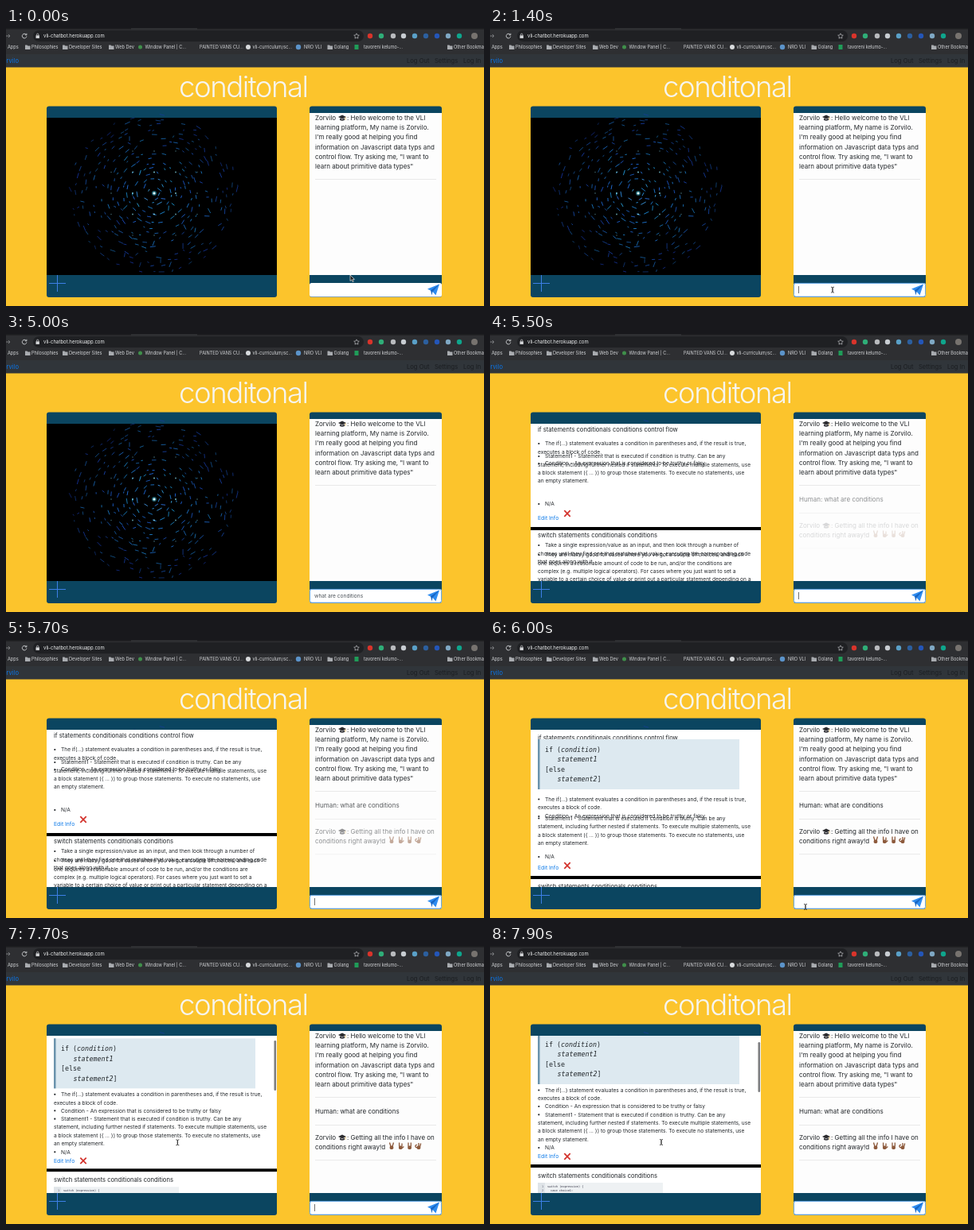
An HTML page for the animation above (8000 ms loop, 600 px wide and 350 px high).

```html
<!DOCTYPE html>
<html lang="en">
<head>
<meta charset="utf-8">
<title>Chatbot demo</title>
<style>
html, body { margin: 0; width: 100%; height: 100%; overflow: hidden; background: #fcc42c; }
svg { display: block; width: 600px; height: 350px; font-family: Inter, "Open Sans", sans-serif; }
.mono { font-family: "DejaVu Sans Mono", monospace; }
</style>
</head>
<body>
<svg id="stage" viewBox="0 0 600 350"></svg>
<script>
const LOOP = 8000, INK = '#212529', TEAL = '#0b4560';
const BOT = 'Zorvilo';

// ---- drawing helpers: y of a text is the middle of its capitals ----
const text = (x, y, size, str, fill = INK, more = '') =>
  `<text x="${x}" y="${y + size * .36}" font-size="${size}" fill="${fill}" ${more}>${str}</text>`;
const lines = (x, y, size, gap, rows, fill) =>
  rows.map((row, i) => text(x, y + i * gap, size, row, fill)).join('');
const rect = (x, y, w, h, fill, more = '') =>
  `<rect x="${x}" y="${y}" width="${w}" height="${h}" fill="${fill}" ${more}/>`;
const dot = (x, y, r, fill, more = '') => `<circle cx="${x}" cy="${y}" r="${r}" fill="${fill}" ${more}/>`;
const path = (d, stroke, width = 1, fill = 'none') =>
  `<path d="${d}" stroke="${stroke}" stroke-width="${width}" fill="${fill}"/>`;
const group = (id, body, more = '') => `<g id="${id}" ${more}>${body}</g>`;
const rule = y => rect(388, y, 152, .6, '#dcdcdc');

// ---- browser window ----
function browser() {
  const gray = '#d4d6d9';
  const folder = x => path(`M${x} 21.5h2.5l1 1h3v4.5h-6.5z`, 'none', 0, '#a9acb0');
  const marks = [[2, 'Apps'], [32, 'Philosophies', 1], [79, 'Developer Sites', 1], [137, 'Web Dev', 1],
    [174.5, 'Window Panel | C...'], [243, 'PAINTED VANS CU...'], [309.5, 'vli-curriculum/sc...'],
    [374, 'NRO VLI'], [411.5, 'Golang', 1], [449, 'tavoreni kelumo-...'], [562, 'Other Bookmarks', 1]];
  const icons = [[457, '#d9342b'], [471, '#2fae78'], [486, '#b9bbbe'], [499, '#c8cdd2'],
    [513, '#5aa0c8'], [527, '#2c5f9e'], [541, '#2456b8'], [555, '#7fa8c4'], [569, '#0fa58c']];
  return rect(0, 0, 600, 33, '#2e2f32') + rect(0, 0, 157, 1.5, '#1c1d1f') + rect(240, 0, 360, 1.5, '#1c1d1f')
    + rect(34, 3, 415, 14, '#1f2023', 'rx="7"')
    + path('M0 10h5M3 8l2 2l-2 2', '#8b8d90', .8)
    + path('M25.3 8.3a2.8 2.8 0 1 0 .6 2.2M25.9 6.8v2h-2', gray, .9)
    + rect(37.5, 9.3, 4.4, 3.6, gray) + path('M38.5 9.5v-1.2a1.2 1.2 0 0 1 2.4 0v1.2', gray, .7)
    + text(47, 10, 6, 'vli-chatbot.herokuapp.com', '#f1f3f4')
    + path('M440 6.8l1 2.1l2.3.3l-1.7 1.6l.4 2.3l-2-1.1l-2 1.1l.4-2.3l-1.7-1.6l2.3-.3z', gray, .6)
    + icons.map(([x, c]) => dot(x, 10, 3.2, c)).join('') + dot(588, 10, 4, '#77736f')
    + marks.map(([x, s, f]) => (f ? folder(x - 8) : '') + text(x, 24, 5.6, s, gray)).join('')
    + dot(168.5, 24, 2.5, '#3f8f4a') + dot(304, 24, 3, '#d8dadc') + dot(367, 24, 3.2, '#5b93c9')
    + rect(437.5, 21, 5, 6, '#1f9d58')
    + rect(0, 33, 600, 16.5, '#30353a')
    + text(16, 41, 7.6, BOT, '#0a74e6', 'text-anchor="end"')
    + text(503, 41, 7.6, 'Log Out', '#1b1e21') + text(538, 41, 7.6, 'Settings', '#1b1e21')
    + text(574, 41, 7.6, 'Log In', '#1b1e21');
}

// ---- swirl of dashes in the black panel ----
function swirl() {
  let seed = 11, out = '';
  const rnd = () => (seed = seed * 16807 % 2147483647) / 2147483647;
  for (let r = 6; r < 104; r += 6.5) {
    const n = Math.round(r * .5) + 3, turn = rnd() * 6;
    for (let i = 0; i < n; i++) {
      if (rnd() < .15 + r / 400) continue;
      const a = turn + (i + rnd() * .7) / n * 2 * Math.PI, rr = r + rnd() * 3;
      const dir = a + Math.PI / 2 + (rnd() - .5) * (rnd() < .25 ? 3 : .6), len = 1 + rnd() * 2.6;
      const x = 186 + rr * Math.cos(a), y = 208 + rr * .94 * Math.sin(a);
      const dx = len * Math.cos(dir), dy = len * Math.sin(dir);
      const color = `hsl(${196 + rnd() * 20 + r / 8} 75% ${(50 - r * .28 + rnd() * 12).toFixed(0)}%)`;
      out += path(`M${(x - dx).toFixed(1)} ${(y - dy).toFixed(1)}L${(x + dx).toFixed(1)} ${(y + dy).toFixed(1)}`, color, .9);
    }
  }
  for (let i = -2; i <= 2; i++) for (let j = -2; j <= 2; j++) {
    const d = Math.hypot(i, j);
    if (d < 2.6) out += dot(186 + 27 * i, 208 + 26.5 * j, 1.3 - d * .25, '#8fe6f5', `opacity="${1 - d * .25}"`);
  }
  return out + dot(186, 208, 3, '#39b9d8', 'opacity=".5"') + dot(186, 208, 1.5, '#e8ffff');
}

// ---- answer cards: [id, content at y 0, y without code, y on arrival, y at rest] ----
const bullet = dot(61.3, 0, 1.1, INK);
const item = (...rows) => bullet + text(69, 0, 6.6, rows[0]) + lines(60, 10.35, 6.6, 10.35, rows.slice(1));
const code = rect(60, 0, 253, 63, '#dde9f0') + rect(60, 0, 2.5, 63, '#6b93ac')
  + [[69, 13, 'if (<tspan font-style="italic">condition</tspan>)'],
     [84.5, 25.3, '<tspan font-style="italic">statement1</tspan>'],
     [69, 38, '[else'],
     [84.5, 50.3, '<tspan font-style="italic">statement2</tspan>]']]
    .map(([x, y, s]) => text(x, y, 8.3, s, '#22272b', 'class="mono"')).join('');
const code2 = rect(60, 0, 157, 60, '#eef1f3') + rect(60, 0, 9, 60, '#dfe4e8')
  + text(65, 4.5, 3.6, '1', '#667', 'class="mono"') + text(72, 4.5, 3.6, 'switch (expression) {', '#334', 'class="mono"')
  + text(65, 9.3, 3.6, '2', '#667', 'class="mono"') + text(76, 9.3, 3.6, 'case choice1:', '#334', 'class="mono"');
const parts = [
  ['title1', text(60, 0, 7.6, 'if statements conditionals conditions control flow'), 120, 123.5, 124],
  ['code1', code, 117, 125, 133],
  ['about', item('The if(...) statement evaluates a condition in parentheses and, if the result is true,',
    'executes a block of code.'), 138, 200.5, 203.5],
  ['cond', item('Condition - An expression that is considered to be truthy or falsy'), 163, 222, 224],
  ['stmt', item('Statement1 - Statement that is executed if condition is truthy. Can be any',
    'statement, including further nested if statements. To execute multiple statements, use',
    'a block statement ({ ... }) to group those statements. To execute no statements, use',
    'an empty statement.'), 154, 224.5, 234.3],
  ['na', item('N/A'), 214, 273, 276],
  ['edit', text(60, 0, 6.8, 'Edit Info', '#0a78e8'), 232, 286.5, 287],
  ['cross', path('M93.3 -3.8l7.4 7.6M100.7 -3.8l-7.4 7.6', '#d3322c', 1.7), 226, 284, 287],
  ['card2', rect(51, -4, 289, 4, '#000') + rect(51, 0, 289, 140, '#fff'), 247, 301, 301],
  ['title2', text(60, 0, 7.6, 'switch statements conditionals conditions'), 253, 310.5, 311],
  ['code2', code2, 310, 320, 320],
  ['take', item('Take a single expression/value as an input, and then look through a number of',
    'choices until they find one that matches that value, executing the corresponding code',
    'that goes along with it'), 266, 390, 390],
  ['they', item("They are mainly good for cases where you've got a couple of choices, and each",
    'one requires a reasonable amount of code to be run, and/or the conditions are',
    'complex (e.g. multiple logical operators). For cases where you just want to set a',
    'variable to a certain choice of value or print out a particular statement depending on a'), 278, 420, 420],
];

// ---- chat ----
const cap = y => path(`M417 ${y - 1}l5-2.6l5 2.6l-5 2.6z`, 'none', 0, '#2b2b2e')
  + path(`M419 ${y + .6}v2.4q3 1.6 6 0v-2.4l-3 1.5z`, 'none', 0, '#3b3b40')
  + path(`M426 ${y - .8}v3.6`, '#d9a441', .7);
const says = (y, first, ...rest) => text(388, y, 8, BOT) + cap(y) + text(428, y, 8, first)
  + lines(388, y + 12.3, 8, 12.3, rest);
const hand = (x, y, fingers) => rect(x - 2.3, y, 4.6, 4.4, '#8d5a3c', 'rx="1.6"') + path(fingers, '#8d5a3c', 1.3);
const hands = y => hand(484, y, `M483 ${y + 1}l-1.5-5M485 ${y + 1}l1.5-5`)
  + hand(495.3, y, `M493.6 ${y + 1}v-5M497 ${y + 1}v-4M497 ${y + 3}l2.4-2`)
  + hand(506.6, y, `M505 ${y + 1}v-5M508.3 ${y + 1}v-5`)
  + hand(518, y, `M517 ${y + 1}a1.6 1.6 0 1 1-1-2M518 ${y + 1}v-4.6M519.7 ${y + 1}l1-4`);

document.getElementById('stage').innerHTML =
  '<clipPath id="view"><rect x="51" y="113" width="289" height="198"/></clipPath>'
  + rect(0, 0, 600, 350, '#fcc42c') + browser()
  + text(217, 73.8, 36.6, 'conditonal', '#f6f5f1', 'font-weight="300" letter-spacing="-1.5"')
  + rect(51, 98.5, 289, 240.5, TEAL, 'rx="3"') + rect(51, 113, 289, 198, '#000') + swirl()
  + group('cards', rect(51, 113, 289, 198, '#fff') + parts.map(([id, body]) => group(id, body)).join('')
    + rect(336.5, 0, 2.6, 63, '#7d7d7d', 'id="thumb" rx="1.3"'), 'clip-path="url(#view)"')
  + path('M54 321.5h21M64.5 311v21', '#3d7fe6', 1)
  + rect(381, 98.5, 166, 240.5, TEAL, 'rx="3"') + rect(381, 107, 166, 204, '#fdfdfd')
  + says(113, ': Hello welcome to the VLI', `learning platform, My name is ${BOT}.`,
    "I'm really good at helping you find", 'information on Javascript data typs and',
    'control flow. Try asking me, "I want to', 'learn about primitive data types"') + rule(190)
  + group('human', text(388, 208, 8, 'Human: what are conditions') + rule(225))
  + group('reply', says(241, ': Getting all the info I have on', 'conditions right away!d') + hands(251.5) + rule(269.5))
  + rect(381, 321, 166, 17.5, '#fff', 'rx="2.5"')
  + rect(381.4, 321.4, 165.2, 16.8, 'none', 'id="focus" rx="2.5" stroke="#5a9fe0" stroke-width="1"')
  + text(387, 329.8, 6.6, '', '#495057', 'id="typed"') + rect(0, 325, .7, 9, '#333', 'id="caret"')
  + path('M529 328.5L544 322.5L539.5 336.5L535.5 332z', 'none', 0, '#2f8df0')
  + path('M544 322.5L535.5 332L534.5 336.5L533 330.3z', 'none', 0, '#1766c4')
  + group('mouse', group('arrow', path('M0 -3v7.5l1.8-1.6l1.3 2.8l1.3-.6l-1.3-2.7h2.4z', '#fff', .6, '#222'))
    + group('beam', path('M-2 -3.5q2 0 2 1v5q0 1-2 1M2 -3.5q-2 0-2 1v5q0 1 2 1', '#222', .8)));

// ---- motion ----
const $ = id => document.getElementById(id);
const show = (id, on) => $(id).setAttribute('opacity', +on);
const move = (id, x, y) => $(id).setAttribute('transform', `translate(${x} ${y})`);
const ramp = (t, a, b) => Math.min(1, Math.max(0, (t - a) / (b - a)));
const ease = k => k * k * (3 - 2 * k);
const mix = (a, b, k) => a + (b - a) * k;

const PHRASE = 'what are conditions';
const keyTimes = [1800, 1900, 2000, 2100, 2200, 2300, 2300, 2500, 2600, 2800, 2900, 3000,
  3200, 3600, 3800, 4000, 4200, 4300, 4500];
const route = [[0, 432, 314], [900, 430, 329], [1700, 430, 330], [5900, 390, 335], [6000, 396, 336],
  [6600, 234, 254], [7300, 216, 248], [7900, 215, 247]];

function draw(t) {
  const sent = t >= 5100;
  const typed = sent ? '' : PHRASE.slice(0, keyTimes.filter(k => k <= t).length);
  $('typed').textContent = typed;
  $('caret').setAttribute('x', 387 + (typed ? $('typed').getComputedTextLength() : 0));
  show('caret', sent ? (t - 4250) % 1000 < 500 : t >= 1300 && t < 5000);
  show('focus', t >= 1300);

  show('human', ramp(t, 5100, 5900));
  show('reply', ramp(t, 5400, 6000));

  show('cards', ramp(t, 5100, 5400));
  const scroll = 14 * ease(ramp(t, 6800, 7300)) + 8 * ramp(t, 7600, 7900);
  const arrive = ease(ramp(t, 5700, 6000)), settle = ease(ramp(t, 6000, 6400));
  for (const [id, , a, b, c] of parts) move(id, 0, mix(mix(a, b, arrive), c, settle) - scroll);
  show('code1', ramp(t, 5700, 5900));
  show('code2', ramp(t, 5700, 5900));
  $('thumb').setAttribute('y', 113 + scroll * 8 / 22);
  show('thumb', t >= 6800);

  const n = Math.max(1, route.findIndex(p => p[0] >= t));
  const [t0, x0, y0] = route[n - 1], [t1, x1, y1] = route[n];
  const k = ramp(t, t0, t1), y = mix(y0, y1, k);
  move('mouse', mix(x0, x1, k), y);
  show('mouse', t < 1700 || t >= 5900);
  const overText = y > 321 || t > 6300;
  show('beam', overText);
  show('arrow', !overText);
}

function frame() {
  draw(Math.floor(performance.now() % LOOP / 100) * 100);
  requestAnimationFrame(frame);
}
frame();
</script>
</body>
</html>
```
